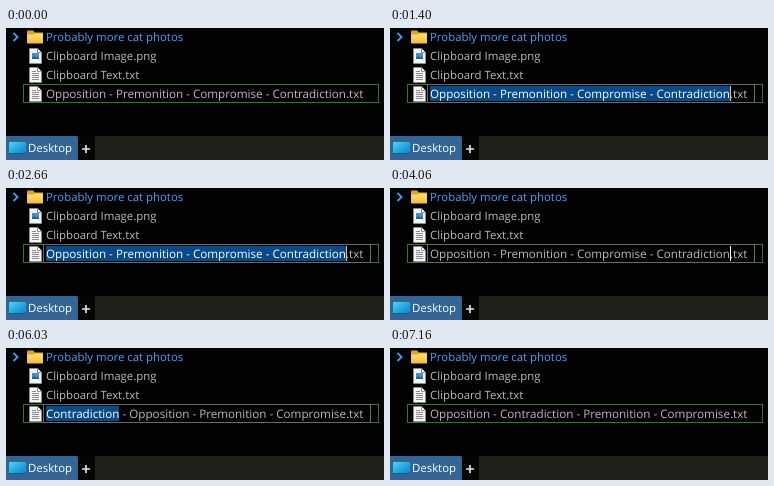
These frames come from a looping animation (378x132 px, 8800 ms). An HTML page:

```html
<!DOCTYPE html>
<html lang="en">
<head>
<meta charset="utf-8">
<title>Inline rename</title>
<style>
  html, body { margin: 0; width: 100%; height: 100%; overflow: hidden; background: #020202; }
  svg { display: block; }
  text {
    font: 11.4px "Open Sans", "Noto Sans", sans-serif;
    fill: #bababa;
    white-space: pre;
    text-rendering: geometricPrecision;
  }
  #name { font-size: 11.65px; }
</style>
</head>
<body>
<svg width="378" height="132" viewBox="0 0 378 132">
  <defs>
    <linearGradient id="screen" x2="1" y2="1">
      <stop offset="0" stop-color="#45d8f5"/><stop offset="1" stop-color="#0a7fca"/>
    </linearGradient>
    <linearGradient id="folder" x2="0" y2="1">
      <stop offset="0" stop-color="#ffdc75"/><stop offset="1" stop-color="#f9bd35"/>
    </linearGradient>
    <g id="page">
      <path d="M.5 .5H8.5L12.5 4.5V15.5H.5Z" fill="#f3f3f3" stroke="#8e8e8e"/>
      <path d="M8.5 .5V4.5H12.5" fill="#fff" stroke="#8e8e8e"/>
    </g>
    <g id="textFile">
      <use href="#page"/>
      <path d="M3 4.5H7M3 6.5H10M3 8.5H10M3 10.5H10M3 12.5H10" stroke="#8d8d8d"/>
    </g>
  </defs>
  <rect width="378" height="132" fill="#020202"/>

  <path d="M7.5 5L11.5 9L7.5 13" fill="none" stroke="#3a9df5" stroke-width="1.9"/>
  <path d="M21 3.5Q21 2.5 22 2.5H27L29 4.5H36Q37 4.5 37 5.5V14H21Z" fill="#e5a522"/>
  <path d="M21 6.5H27.5L29 5.5H37V14.5Q37 15.5 36 15.5H22Q21 15.5 21 14.5Z" fill="url(#folder)"/>
  <text x="40" y="13" style="fill:#46a3ff">Probably more cat photos</text>

  <use href="#page" x="23" y="20"/>
  <rect x="26" y="25" width="7" height="6" fill="#3994d6"/>
  <path d="M26 31V30L28 28L30 29.5L31 28.5L33 30V31Z" fill="#265f85"/>
  <text x="40" y="32">Clipboard Image.png</text>

  <use href="#textFile" x="23" y="39"/>
  <text x="40" y="51">Clipboard Text.txt</text>

  <rect x="17.5" y="56.5" width="355" height="18" fill="none" stroke="#317d13"/>
  <use href="#textFile" x="23" y="58"/>
  <rect id="editor" x="37.5" y="56.5" width="327" height="18" fill="#020202" stroke="#696969"/>
  <rect id="selection" y="58" height="15" fill="#064a8a"/>
  <text id="name" x="40" y="70"><tspan></tspan><tspan fill="#fff"></tspan><tspan></tspan></text>
  <rect id="caret" y="58" width="1" height="15"/>

  <rect y="108" width="378" height="24" fill="#20201a"/>
  <path d="M0 108H70Q72 108 72 110V132H0Z" fill="#326594"/>
  <rect x="72" y="108" width="17" height="24" fill="#050505"/>
  <rect x="3" y="114" width="17" height="12" rx="1" fill="url(#screen)"/>
  <path d="M3 125.5H20" stroke="#0d629c"/>
  <text x="22" y="124" style="fill:#fff">Desktop</text>
  <path d="M76 121H84M80 117V125" stroke="#e4e4e4" stroke-width="1.7"/>
</svg>
<script>
const LOOP = 8800;
const [A, B, C, D] = ["Opposition", "Premonition", "Compromise", "Contradiction"];
const fileName = (...words) => words.join(" - ") + ".txt";
const before = fileName(A, B, C, D);
const stem = before.slice(0, -4);
const third = fileName(A, B, D, C);
const second = fileName(A, D, B, C);
const first = fileName(D, A, B, C);

// Start time, file name, selected part, caret visible; only edit states have a selection.
const states = [
  [0, before],
  [360, before, stem, true],
  [860, before, stem, false],
  [1400, before, stem, true],
  [1600, before, "txt", true],
  [2130, before, "txt", false],
  [2660, before, stem, true],
  [3230, before, stem, false],
  [3800, before, stem, true],
  [4060, before, "", true],
  [4630, before, "", false],
  [4860, third, D, true],
  [5200, second, D, true],
  [5460, first, D, true],
  [6030, first, D, false],
  [6200, second, D, true],
  [6760, second, D, false],
  [7130, before],
  [7160, second]
];

const $ = id => document.getElementById(id);
const label = $("name"), parts = label.children;
const show = (id, on) => $(id).setAttribute("visibility", on ? "visible" : "hidden");
const place = (id, attrs) => {
  for (const key in attrs) $(id).setAttribute(key, attrs[key]);
};
let current;

function draw(time) {
  const state = states.findLast(s => s[0] <= time);
  if (state === current) return;
  current = state;
  const [, name, selected, caretOn] = state;
  const editing = selected !== undefined;
  const start = selected ? name.indexOf(selected) : stem.length;
  const end = start + (selected || "").length;
  [name.slice(0, start), name.slice(start, end), name.slice(end)]
    .forEach((text, i) => parts[i].textContent = text);

  const edge = i => Math.round(40 + (i ? label.getSubStringLength(0, i) : 0));
  const left = edge(start), right = edge(end);
  place("selection", { x: left, width: right - left });
  place("caret", { x: right, fill: selected === stem ? "#ffb575" : "#fff" });
  show("editor", editing);
  show("selection", editing && selected);
  show("caret", editing && caretOn);
}

function tick() {
  draw(performance.now() % LOOP);
  requestAnimationFrame(tick);
}
tick();
</script>
</body>
</html>
```
